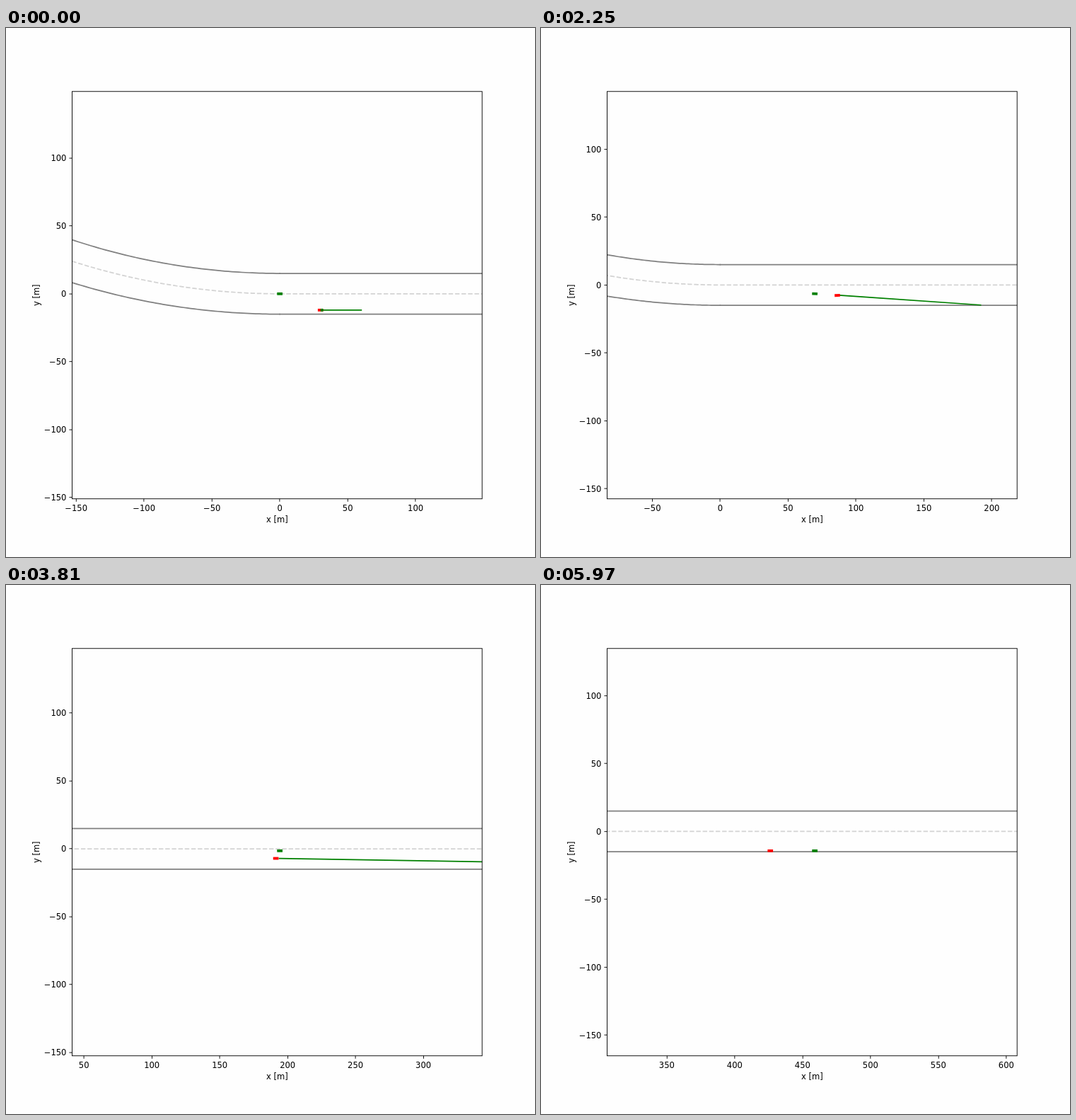
An HTML page with a canvas for the animation above (6000 ms loop, 748 by 748 pixels).

```html
<!DOCTYPE html>
<html lang="en">
<head>
<meta charset="utf-8">
<title>Lane tracking plot</title>
<style>
  html, body { margin: 0; width: 100%; height: 100%; overflow: hidden; background: #fefefe; }
  canvas { display: block; width: 748px; height: 748px; }
</style>
</head>
<body>
<canvas id="plot" width="748" height="748"></canvas>
<script>
const ctx = document.getElementById('plot').getContext('2d');
const LOOP = 6000, STEP = 30, LAST = LOOP / STEP - 1;
const SIZE = 748, PX = SIZE / 900;          // one device pixel of the 9 inch plot
const PT = PX * 100 / 72;                   // one typographic point
const L = SIZE * 0.125, R = SIZE * 0.9, T = SIZE * 0.12, B = SIZE * 0.89;
const S = (B - T) / 300;                    // pixels per metre
const LINE = 1.5 * PT;
const GREEN = '#008000', RED = '#ff0000';
const HORIZON = 1.565;                      // seconds covered by the plan

// Sideways swing from one level to another between two times
function swing(t, t0, t1, from, to) {
  const u = Math.min(1, Math.max(0, (t - t0) / (t1 - t0)));
  return from + (to - from) * u * u * (3 - 2 * u);
}

// Steady acceleration that eases off slightly near t = 3.9 s
function lead(t) {
  const accel = 26.65 - 0.9 * Math.tanh((t - 3.908) / 0.751);
  const y = t < 2.5 ? swing(t, 0.5, 2.5, 0, -6.8)
    : t < 3.98 ? swing(t, 2.5, 3.98, -6.8, -1.2)
    : swing(t, 3.98, 5.9, -1.2, -14.3);
  return [accel * t * t / 2, y];
}

function chase(t) {
  const y = t < 3.5 ? swing(t, 0.4, 2.8, -12, -7) : swing(t, 4.12, 5.78, -7, -14.3);
  return [30 + 11.118 * t * t, y];
}

function planEnd(t) {
  const y = t < 2.2 ? swing(t, 1, 2.2, -12, -14.8)
    : t < 3.8 ? swing(t, 2.2, 3.55, -14.8, -9.6)
    : swing(t, 4.2, 5.8, -9.6, -14.3);
  return [Math.max(chase(t)[0] + 30, chase(t + HORIZON)[0]), y];
}

function heading(path, t) {
  const [x0, y0] = path(t), [x1, y1] = path(t + 0.01);
  return Math.atan2(y1 - y0, x1 - x0);
}

const snap = v => (Math.floor(v / PX) + 0.5) * PX;
const label = v => (v < 0 ? '\u2212' : '') + Math.abs(v);

function stroke(points, color, width, dash = []) {
  ctx.strokeStyle = color;
  ctx.lineWidth = width;
  ctx.setLineDash(dash);
  ctx.beginPath();
  points.forEach(([x, y]) => ctx.lineTo(x, y));
  ctx.stroke();
}

function draw(frame) {
  const t = frame * STEP / 1000;
  const [ox, oy] = lead(t), [cx, cy] = chase(t);
  const X = x => R - 149 * S + (x - ox) * S;
  const Y = y => T + 149 * S - (y - oy) * S;
  const at = ([x, y]) => [X(x), Y(y)];

  // Road: a circular bend about (0, 500), then a straight
  function lane(offset, color, dash) {
    const from = ox - (X(ox) + PX) / S, r = 500 - offset, bend = [];
    if (from < 0) {
      for (let i = 0; i <= 80; i++) {
        const x = from * (1 - i / 80);
        bend.push(at([x, 500 - Math.sqrt(r * r - x * x)]));
      }
      stroke(bend, color, LINE, dash);
    }
    stroke([at([Math.max(0, from), offset]), [SIZE + PX, Y(offset)]], color, LINE, dash);
  }

  function car(x, y, angle, color) {
    ctx.save();
    ctx.translate(X(x), Y(y));
    ctx.rotate(-angle);
    ctx.fillStyle = color;
    ctx.fillRect(-2 * S, -S, 4 * S, 2 * S);
    ctx.restore();
  }

  ctx.fillStyle = '#fefefe';
  ctx.fillRect(0, 0, SIZE, SIZE);

  ctx.save();
  ctx.beginPath();
  ctx.rect(L, T, R - L, B - T);
  ctx.clip();
  ctx.lineCap = 'butt';
  lane(0, '#d3d3d3', [3.7 * LINE, 1.6 * LINE]);
  ctx.lineCap = 'square';
  lane(15, '#808080');
  lane(-15, '#808080');
  if (frame < LAST) stroke([at(chase(t + 0.03)), at(planEnd(t))], GREEN, LINE);
  car(cx, cy, heading(chase, t), RED);
  if (t === 0) {
    ctx.fillStyle = GREEN;                  // the plan still starts inside the car
    ctx.fillRect(X(cx), Y(cy) - S, 2 * S, 2 * S);
  }
  car(ox, oy, heading(lead, t), GREEN);
  ctx.restore();

  // Axes
  const thin = 0.8 * PT, tick = 3.5 * PT;
  ctx.lineCap = 'butt';
  ctx.font = `${10 * PT}px "DejaVu Sans", sans-serif`;
  ctx.fillStyle = '#000';

  ctx.textAlign = 'center';
  for (let v = Math.ceil((ox - 151) / 50) * 50 - 50; X(v) <= R; v += 50) {
    if (X(v) < L) continue;
    const x = snap(X(v));
    stroke([[x, B], [x, B + tick]], '#000', thin);
    ctx.fillText(label(v), X(v), 682.7);
  }
  ctx.textAlign = 'right';
  for (let v = Math.ceil((oy - 151) / 50) * 50; Y(v) >= T; v += 50) {
    const y = snap(Y(v));
    stroke([[L - tick, y], [L, y]], '#000', thin);
    ctx.fillText(label(v), L - 7 * PT, Y(v) + 4.3);
  }
  ctx.strokeRect(L, T, R - L, B - T);

  ctx.textAlign = 'center';
  ctx.fillText('x [m]', (L + R) / 2, 699.3);
  ctx.save();
  ctx.translate(46.6, (T + B) / 2);
  ctx.rotate(-Math.PI / 2);
  ctx.fillText('y [m]', 0, 0);
  ctx.restore();
}

const begin = performance.now();
function play() {
  const elapsed = (performance.now() - begin) % LOOP;
  draw(Math.floor(elapsed / STEP));
  requestAnimationFrame(play);
}
play();
</script>
</body>
</html>
```
